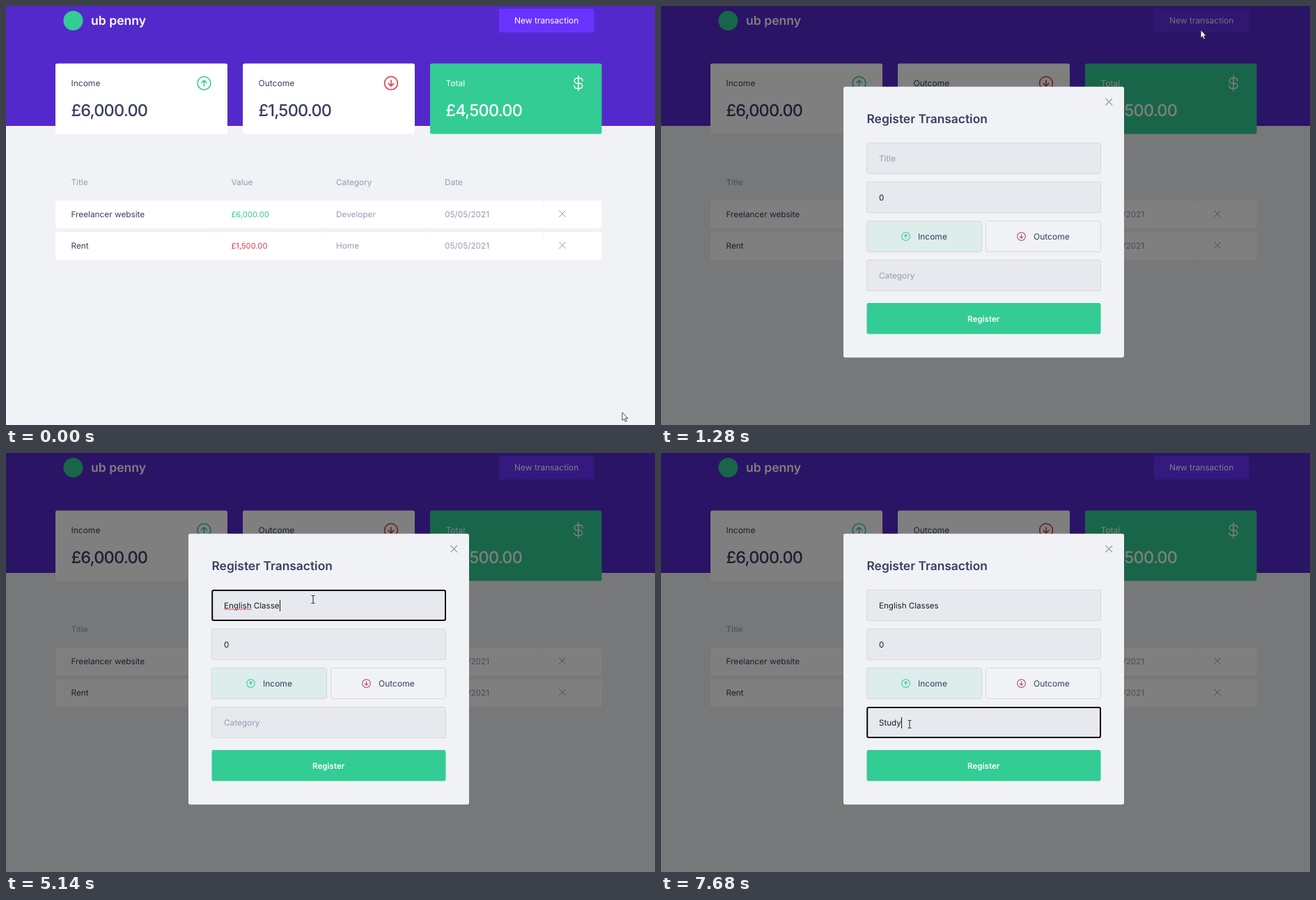
These frames come from a looping animation (932 by 601 pixels, 8000 ms). An HTML page:

```html
<!DOCTYPE html>
<html lang="en">
<head>
<meta charset="utf-8">
<title>Finance dashboard</title>
<style>
  html, body { margin: 0; width: 100%; height: 100%; overflow: hidden; background: #f0f2f5; }
  svg { display: block; width: 932px; height: 601px; }
  text {
    font: 400 11.8px Inter, "Open Sans", sans-serif;
    fill: #363f5f; white-space: pre; text-rendering: geometricPrecision;
  }
  .label text, text.label { font-size: 12px; }
  text.amount { font-size: 23.5px; font-weight: 500; letter-spacing: -.8px; }
  text.brand { font-size: 17.6px; font-weight: 600; fill: #fff; }
  text.heading { font-size: 17.4px; font-weight: 600; }
  text.submit { font-size: 11.6px; font-weight: 600; fill: #fff; }
  text.money { font-size: 11.2px; }
  .muted text, text.muted { fill: #969cb3; }
  .white, text.white { fill: #fff; }
  text.in, .green { fill: #33cc95; }
  text.out { fill: #d83f4c; }
  text.typed { font-size: 11.6px; fill: #1c1c20; }
  .line { fill: none; stroke-linecap: round; stroke-linejoin: round; }
  .input { fill: #e7e9ee; stroke: #d7d7d7; }
  .focus { fill: none; stroke: #0b0b0d; stroke-width: 2; }
  .caret { fill: #111; }
</style>
</head>
<body>
<svg viewBox="0 0 932 601">
  <defs>
    <g id="up" class="line">
      <circle r="9.4"/>
      <path d="M0 4.2V-4.2M-3.8-.4L0-4.2 3.8-.4"/>
    </g>
    <path id="close" class="line" d="M-4.5-4.5l9 9M4.5-4.5l-9 9"/>
    <g id="row" class="white">
      <rect x="71" width="230.5" height="40" rx="2.8"/>
      <rect x="301.5" width="150.5" height="40" rx="2.8"/>
      <rect x="452" width="155.5" height="40" rx="2.8"/>
      <rect x="607.5" width="164" height="40" rx="2.8"/>
      <rect x="771.5" width="84" height="40" rx="2.8"/>
    </g>
  </defs>

  <rect width="932" height="601" fill="#f0f2f5"/>
  <rect width="932" height="172" fill="#5429cc"/>
  <circle class="green" cx="96.5" cy="21" r="14"/>
  <text class="brand" x="122" y="27">ub penny</text>
  <g id="newButton">
    <rect x="708" y="4" width="136.5" height="34" rx="2.8" fill="#6933ff"/>
    <text class="label white" x="730" y="25">New transaction</text>
  </g>

  <g class="label">
    <rect class="white" x="71" y="82.5" width="247" height="101" rx="2.8"/>
    <rect class="white" x="340" y="82.5" width="247" height="101" rx="2.8"/>
    <rect class="green" x="609" y="82.5" width="246.5" height="101" rx="2.8"/>
    <text x="93.5" y="115">Income</text>
    <text x="362.5" y="115">Outcome</text>
    <text class="white" x="631.5" y="115">Total</text>
  </g>
  <text class="amount" x="93.5" y="158">£6,000.00</text>
  <text class="amount" x="362.5" y="158">£1,500.00</text>
  <text class="amount white" x="631.5" y="158">£4,500.00</text>
  <use href="#up" transform="translate(284.5 110.7)" stroke="#33cc95" stroke-width="1.5"/>
  <use href="#up" transform="translate(553 110.7) rotate(180)" stroke="#dc3545" stroke-width="1.5"/>
  <path class="line" stroke="#fff" stroke-width="1.5" d="M822 100V121.5M828 107.5c0-2.5-1.5-4-4-4h-4a3.7 3.7 0 0 0 0 7.4h4a3.7 3.7 0 0 1 0 7.4h-4c-2.5 0-4-1.5-4-4"/>

  <g class="muted">
    <text x="93.5" y="257">Title</text>
    <text x="323.5" y="257">Value</text>
    <text x="474" y="257">Category</text>
    <text x="630" y="257">Date</text>
  </g>
  <use href="#row" y="279"/>
  <use href="#row" y="324.3"/>
  <text x="93.5" y="302.5">Freelancer website</text>
  <text x="93.5" y="348">Rent</text>
  <text class="money in" x="323.5" y="302.5">£6,000.00</text>
  <text class="money out" x="323.5" y="348">£1,500.00</text>
  <g class="muted">
    <text x="474" y="302.5">Developer</text>
    <text x="474" y="348">Home</text>
    <text x="630" y="302.5">05/05/2021</text>
    <text x="630" y="348">05/05/2021</text>
  </g>
  <use href="#close" x="799" y="298" stroke="#999"/>
  <use href="#close" x="799" y="343.3" stroke="#999"/>

  <g id="modal">
    <rect width="932" height="601" opacity=".5"/>
    <rect x="262" y="115.7" width="403" height="388.6" rx="2.8" fill="#f0f2f5"/>
    <use href="#close" x="643.3" y="137.5" stroke="#969cb3" stroke-width="1.2"/>
    <text class="heading" x="295.5" y="167.5">Register Transaction</text>
    <g class="input">
      <rect x="295.5" y="196.5" width="336" height="44" rx="2.8"/>
      <rect x="295.5" y="252.5" width="336" height="44" rx="2.8"/>
      <rect x="295.5" y="308.5" width="165" height="44" rx="2.8" fill="#dcedeb"/>
      <rect x="466.5" y="308.5" width="165" height="44" rx="2.8" fill="#f0f2f5"/>
      <rect x="295.5" y="364.5" width="336" height="44" rx="2.8"/>
    </g>
    <text class="typed" x="313" y="278.7">0</text>
    <g class="label">
      <text x="369" y="335">Income</text>
      <text x="535" y="335">Outcome</text>
    </g>
    <use href="#up" transform="translate(351.5 330.5) scale(.62)" stroke="#33cc95" stroke-width="1.7"/>
    <use href="#up" transform="translate(517.5 330.5) rotate(180) scale(.62)" stroke="#b5405a" stroke-width="1.7"/>
    <rect class="green" x="295.5" y="426" width="336" height="44.6" rx="2.8"/>
    <text class="submit" x="440" y="452.7">Register</text>

    <g id="titleField">
      <rect class="focus" x="296.2" y="197" width="334.8" height="43" rx="2.2"/>
      <text class="hint muted" x="313" y="222.7">Title</text>
      <text class="typed" x="313" y="222.7"></text>
      <rect class="caret" y="211" width="1" height="16"/>
    </g>
    <path id="squiggle" class="line" stroke="#e0383e" stroke-width=".9"/>
    <g id="categoryField">
      <rect class="focus" x="296.2" y="365" width="334.8" height="43" rx="2.2"/>
      <text class="hint muted" x="313" y="391">Category</text>
      <text class="typed" x="313" y="391"></text>
      <rect class="caret" y="379" width="1" height="16"/>
    </g>
  </g>

  <circle id="click" r="8.7" fill="#e8d02e" opacity=".68"/>
  <path id="arrow" fill="#fff" stroke="#1d1d24" stroke-width=".8" stroke-linejoin="round" d="M0 0V11.4L2.6 9.1 4.4 13.1 6.3 12.3 4.6 8.3H8Z"/>
  <path id="beam" fill="none" stroke="#222" d="M-2.5-5.5h2L0-5 .5-5.5h2M0-5V5M-2.5 5.5h2L0 5 .5 5.5h2"/>
</svg>
<script>
  const LOOP = 8000, OPEN = 1280, BLINK = 530;
  const $ = id => document.getElementById(id);
  const show = (el, on) => { el.style.display = on ? "" : "none"; };
  const ramp = (t, from, to) => Math.min(1, Math.max(0, (t - from) / (to - from)));
  const within = (t, from, to) => t >= from && t < to;

  // Pointer path: time, x, y
  const path = [
    [70, 885, 583], [200, 836, 515], [380, 788, 380], [540, 776, 212],
    [650, 769, 115], [740, 790, 52], [800, 790, 39], [930, 788, 36],
    [1140, 782, 25], [1210, 782, 25], [1280, 776, 34], [1400, 670, 98],
    [1520, 490, 190], [1610, 441, 210], [5930, 441, 210], [6080, 402, 290],
    [6210, 361, 372], [6280, 356, 384], [6400, 357, 389]
  ];
  const clicks = [[1140, 1270], [1870, 2070], [6420, 6620]];
  const fields = [
    { el: $("titleField"), text: "English Classes", focus: 1870, blur: 6420,
      keys: [2340, 2740, 2940, 3070, 3270, 3420, 3620, 3880, 4210, 4410, 4610, 4740, 5010, 5140, 5400] },
    { el: $("categoryField"), text: "Study", focus: 6420, blur: LOOP,
      keys: [6890, 7150, 7350, 7550, 7680] }
  ];
  $("squiggle").setAttribute("d", "M313 225" + "l1.5-1.4l1.5 1.4".repeat(13));

  function pointerAt(t) {
    const i = path.findIndex(p => p[0] > t);
    if (i === 0) return path[0].slice(1);
    if (i < 0) return path[path.length - 1].slice(1);
    const [t0, x0, y0] = path[i - 1], [t1, x1, y1] = path[i];
    const k = ramp(t, t0, t1);
    return [x0 + (x1 - x0) * k, y0 + (y1 - y0) * k];
  }

  function drawField({ el, text, focus, blur, keys }, t) {
    const part = name => el.querySelector("." + name);
    const count = keys.filter(k => k <= t).length;
    const lastEvent = count ? keys[count - 1] : focus;
    const active = within(t, focus, blur);
    const typed = part("typed"), caret = part("caret");
    typed.textContent = text.slice(0, count);
    show(part("hint"), !count);
    show(part("focus"), active);
    show(caret, active && Math.floor((t - lastEvent) / BLINK) % 2 === 0);
    caret.setAttribute("x", Math.round(313 + (count ? typed.getComputedTextLength() : 0)));
  }

  function drawPointer(t) {
    const [x, y] = pointerAt(t);
    const overInput = t >= OPEN && within(x, 295, 632) &&
      [196, 252, 364].some(top => within(y, top, top + 45));
    for (const id of ["arrow", "beam", "click"])
      $(id).setAttribute("transform", `translate(${x} ${y})`);
    show($("arrow"), !overInput);
    show($("beam"), overInput);
    show($("click"), clicks.some(([from, to]) => within(t, from, to)));
  }

  function draw(t) {
    const hover = ramp(t, 1000, 1200) - ramp(t, OPEN, OPEN + 200);
    $("newButton").style.filter = hover ? `brightness(${1 - .1 * hover})` : "none";
    show($("modal"), t >= OPEN);
    show($("squiggle"), within(t, 3880, 6420));
    fields.forEach(field => drawField(field, t));
    drawPointer(t);
  }

  const start = performance.now();
  function tick() {
    draw((performance.now() - start) % LOOP);
    requestAnimationFrame(tick);
  }
  tick();
</script>
</body>
</html>
```
